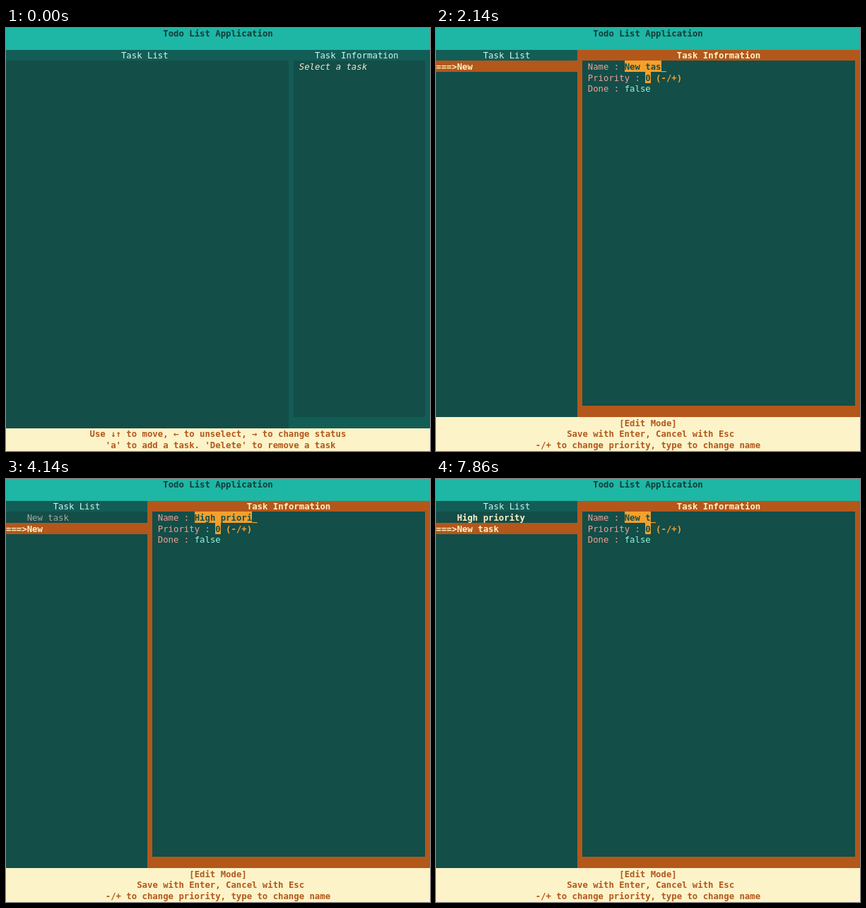
These frames come from a looping animation (600 by 598 pixels, 8 s). An HTML page with a canvas:

```html
<!DOCTYPE html>
<html lang="en">
<head>
<meta charset="utf-8">
<title>Todo List Application</title>
<style>
  html, body { margin: 0; width: 100%; height: 100%; overflow: hidden; background: #fcf3c8; }
  canvas { display: block; width: 600px; height: 598px; }
</style>
</head>
<body>
<canvas id="screen" width="600" height="598"></canvas>
<script>
const ctx = document.getElementById('screen').getContext('2d');
const LOOP = 8000;
const CELL = 600 / 81, LINE = 15.74, TOP = -0.8, BASE = 12.4;
const FONT = '12.304px "DejaVu Sans Mono", monospace';
const C = {
  header: '#1eb6a4', headerText: '#133b38', frame: '#135d57', panel: '#134e48',
  title: '#ccf7ec', select: '#149184', dark: '#0a2b2a', cream: '#fdf2c6',
  rust: '#b3571b', amber: '#f5a02c', label: '#eda197', value: '#98f3e0',
  dim: '#a5a8a0', hint: '#f0e6cc', footer: '#fcf3c8'
};

// All positions are in terminal cells.
const x = col => Math.round(col * CELL);
const y = row => Math.round(TOP + row * LINE);

function box(c0, r0, c1, r1, color) {
  ctx.fillStyle = color;
  ctx.fillRect(x(c0), y(r0), x(c1) - x(c0), y(r1) - y(r0));
}

function text(str, col, row, color, style = '') {
  ctx.font = `${style} ${FONT}`;
  ctx.fillStyle = color;
  ctx.fillText(str, col * CELL, TOP + row * LINE + BASE);
}

const bold = (str, col, row, color) => text(str, col, row, color, 'bold');

function footer(firstRow, lines) {
  ctx.fillStyle = C.footer;
  ctx.fillRect(0, y(firstRow), 600, 598 - y(firstRow));
  lines.forEach((line, i) => bold(line, Math.ceil((81 - line.length) / 2), firstRow + i, C.rust));
}

function taskRow(task, i, selected, edit, width) {
  const row = 3 + i;
  if (selected) {
    box(0, row, width, row + 1, edit ? C.rust : C.select);
    const color = edit ? C.cream : C.dark;
    bold(edit ? '===>' : ' => ', 0, row, color);
    bold(task.name, 4, row, color);
  } else if (task.priority > 0) {
    bold(task.name, 4, row, C.cream);
  } else {
    text(task.name, 4, row, C.dim);
  }
}

function info(col, task, edit) {
  ['Name :', 'Priority :', 'Done :'].forEach((s, i) => text(s, col, 3 + i, C.label));
  text('false', col + 7, 5, C.value);
  if (!edit) {
    text(task.name, col + 7, 3, C.value);
    text(String(task.priority), col + 11, 4, C.value);
    return;
  }
  const end = col + 7 + edit.name.length;
  box(col + 7, 3, end, 4, C.amber);
  bold(edit.name, col + 7, 3, C.panel);
  bold('_', end, 3, C.amber);
  box(col + 11, 4, col + 12, 5, C.amber);
  bold(String(edit.priority), col + 11, 4, C.panel);
  bold('(-/+)', col + 13, 4, C.amber);
}

function draw({ tasks, sel, edit }) {
  const width = edit ? 27 : 54;
  const bottom = edit ? 35 : 36;
  box(0, 0, 81, 2, C.header);
  bold('Todo List Application', 30, 0, C.headerText);

  box(0, 2, width, 3, C.frame);
  box(0, 3, width, bottom, C.panel);
  text('Task List', (width - 9) >> 1, 2, C.title);
  tasks.forEach((task, i) => taskRow(task, i, i === sel, edit, width));

  box(width, 2, 81, bottom, edit ? C.rust : C.frame);
  box(width + 1, 3, 80, bottom - 1, C.panel);
  if (edit) bold('Task Information', 46, 2, C.cream);
  else text('Task Information', 59, 2, C.title);
  if (sel < 0) text('Select a task', width + 2, 3, C.hint, 'italic');
  else info(width + 2, tasks[sel], edit);

  if (edit) footer(35, ['[Edit Mode]', 'Save with Enter, Cancel with Esc',
    '-/+ to change priority, type to change name']);
  else footer(36, ['Use ↓↑ to move, ← to unselect, → to change status',
    "'a' to add a task. 'Delete' to remove a task"]);
}

// Number of key presses made by time t, the first one at start.
const presses = (t, start, gap, max) =>
  Math.max(0, Math.min(max, Math.floor((t - start) / gap) + 1));

const fresh = { name: 'New', priority: 0 };
const plain = { name: 'New task', priority: 0 };
const high = { name: 'High priority', priority: 8 };

function firstName(t) {
  return plain.name.slice(0, 3 + presses(t, 1705, 112, 5));
}

function secondName(t) {
  const typed = presses(t, 3130, 100, 13);
  return typed ? high.name.slice(0, typed) : 'New'.slice(0, 3 - presses(t, 2960, 50, 3));
}

function stateAt(t) {
  if (t < 425) return { tasks: [], sel: -1 };
  if (t < 2285) return { tasks: [fresh], sel: 0, edit: { name: firstName(t), priority: 0 } };
  if (t < 2855) return { tasks: [plain], sel: 0 };
  if (t < 6135) return {
    tasks: [plain, fresh], sel: 1,
    edit: { name: secondName(t), priority: presses(t, 4855, 142, 8) }
  };
  const tasks = [high, plain];
  if (t < 6995) return { tasks, sel: 0 };
  if (t < 7285) return { tasks, sel: 1 };
  const name = plain.name.slice(0, 8 - presses(t, 7565, 142, 3));
  return { tasks, sel: 1, edit: { name, priority: 0 } };
}

const start = performance.now();
function tick() {
  draw(stateAt((performance.now() - start) % LOOP));
  requestAnimationFrame(tick);
}
tick();
</script>
</body>
</html>
```
